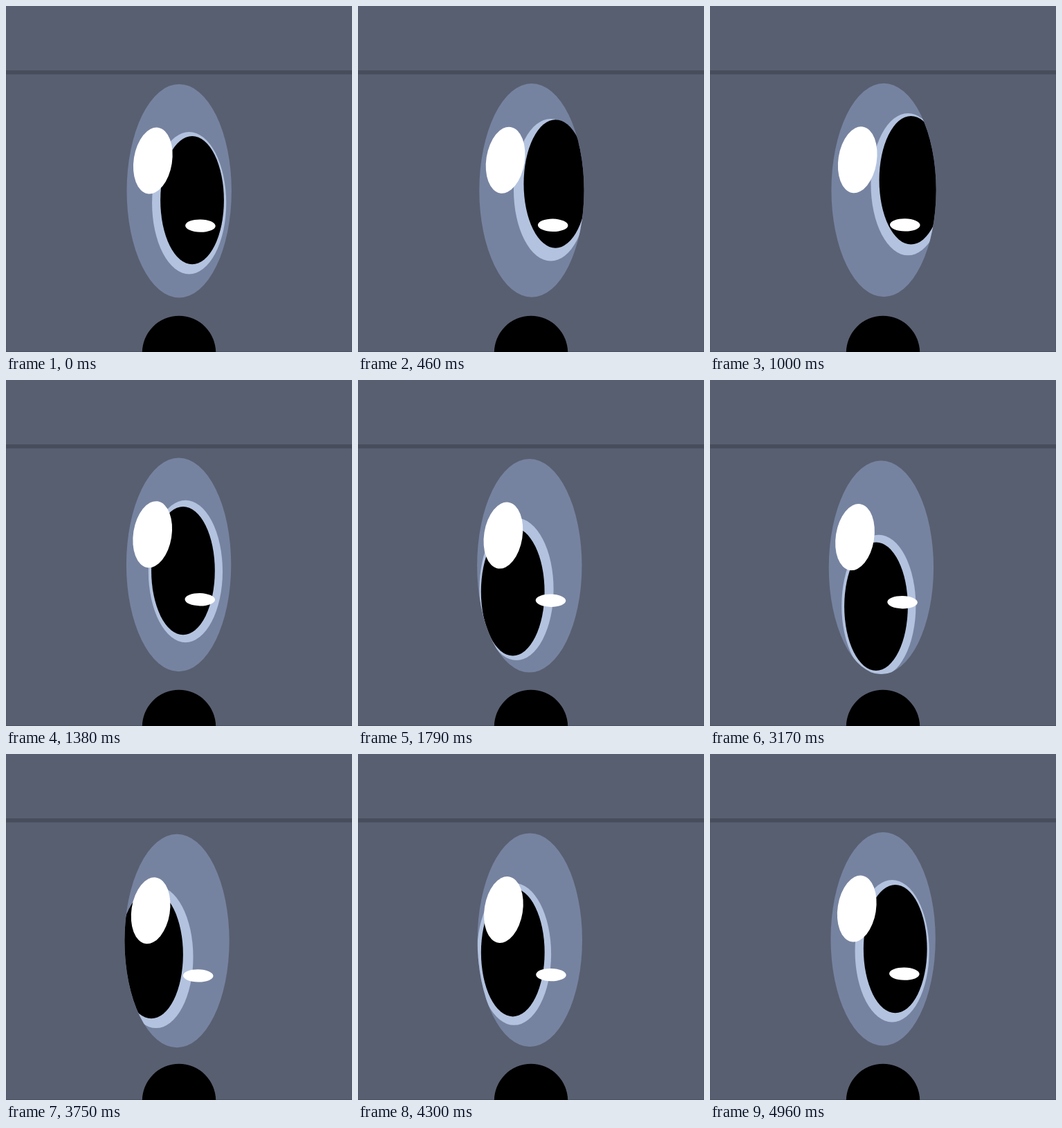
Animation of 500x500 px, one loop 5 s. Source, as an HTML page:

```html
<!DOCTYPE html>
<html lang="en">
<head>
<meta charset="utf-8">
<title>Looking around</title>
<style>
  html, body { margin: 0; width: 100%; height: 100%; overflow: hidden; background: #585f71; }
  svg { display: block; width: 100%; height: 100%; }
</style>
</head>
<body>
<svg viewBox="0 0 500 500">
  <defs>
    <ellipse id="ball" cx="250.2" cy="267.2" rx="75.7" ry="154.3"/>
    <clipPath id="inside"><use href="#ball"/></clipPath>
  </defs>
  <rect width="500" height="500" fill="#585f71"/>
  <rect x="-2.6" y="95.9" width="505.2" height="406.3" fill="none" stroke="#474d5b" stroke-width="5.8"/>
  <circle cx="250" cy="501" r="53.2"/>
  <g id="eye">
    <use href="#ball" fill="#7683a0"/>
    <g clip-path="url(#inside)">
      <ellipse id="iris" rx="53.6" ry="102.7" fill="#b3c2de"/>
      <ellipse id="pupil" rx="45.9" ry="92.7"/>
    </g>
    <g fill="#fff">
      <ellipse rx="27.7" ry="48.4" transform="translate(212.3 223.5) rotate(9)"/>
      <ellipse rx="21.8" ry="9.2" transform="translate(280.9 317.6) rotate(1)"/>
    </g>
  </g>
</svg>
<script>
  const LOOP = 5000;
  const IRIS_LAG = 50;
  const IRIS_REACH = 0.85;

  // Points the pupil and the eyeball pass through: time in ms, then offset
  const gaze = [
    [0, 0, 0], [600, 20, -29], [1000, 21.5, -29], [1790, -45.3, 25],
    [2540, -21.2, 73.3], [2900, -16, 64], [3750, -59, 9], [4300, -45.3, 6], [4900, -4, 1]
  ];
  const drift = [
    [0, 0, 0], [1000, 0.9, -1.2], [1790, -2.4, 1.1],
    [2540, -2.2, 3.8], [3750, -3.2, 2.8], [4300, -1.9, 1.5]
  ];

  // Smooth closed curve through the keys
  function follow(keys, now) {
    const time = (now + LOOP) % LOOP;
    const key = i => {
      const turn = Math.floor(i / keys.length);
      const [t, x, y] = keys[i - turn * keys.length];
      return [t + turn * LOOP, x, y];
    };
    const i = keys.findLastIndex(k => k[0] <= time);
    const [before, a, b, after] = [i - 1, i, i + 1, i + 2].map(key);
    const slope = (p, q, axis) => (q[axis] - p[axis]) / (q[0] - p[0]);
    const span = b[0] - a[0];
    const u = (time - a[0]) / span;
    const v = 1 - u;
    return [1, 2].map(axis =>
      v * v * (1 + 2 * u) * a[axis] + u * u * (1 + 2 * v) * b[axis]
      + span * u * v * (v * slope(before, b, axis) - u * slope(a, after, axis)));
  }

  const [eye, iris, pupil] = ["eye", "iris", "pupil"].map(id => document.getElementById(id));

  function place(part, x, y) {
    part.setAttribute("cx", x);
    part.setAttribute("cy", y);
  }

  function draw(time) {
    const [dx, dy] = follow(drift, time);
    const [px, py] = follow(gaze, time);
    const [ix, iy] = follow(gaze, time - IRIS_LAG);
    eye.setAttribute("transform", `translate(${dx} ${dy})`);
    place(pupil, 269 + px - dx, 280.7 + py - dy);
    place(iris, 266 + ix * IRIS_REACH - dx, 283.9 + iy * IRIS_REACH - dy);
  }

  const start = performance.now();
  function tick() {
    draw((performance.now() - start) % LOOP);
    requestAnimationFrame(tick);
  }
  tick();
</script>
</body>
</html>
```
